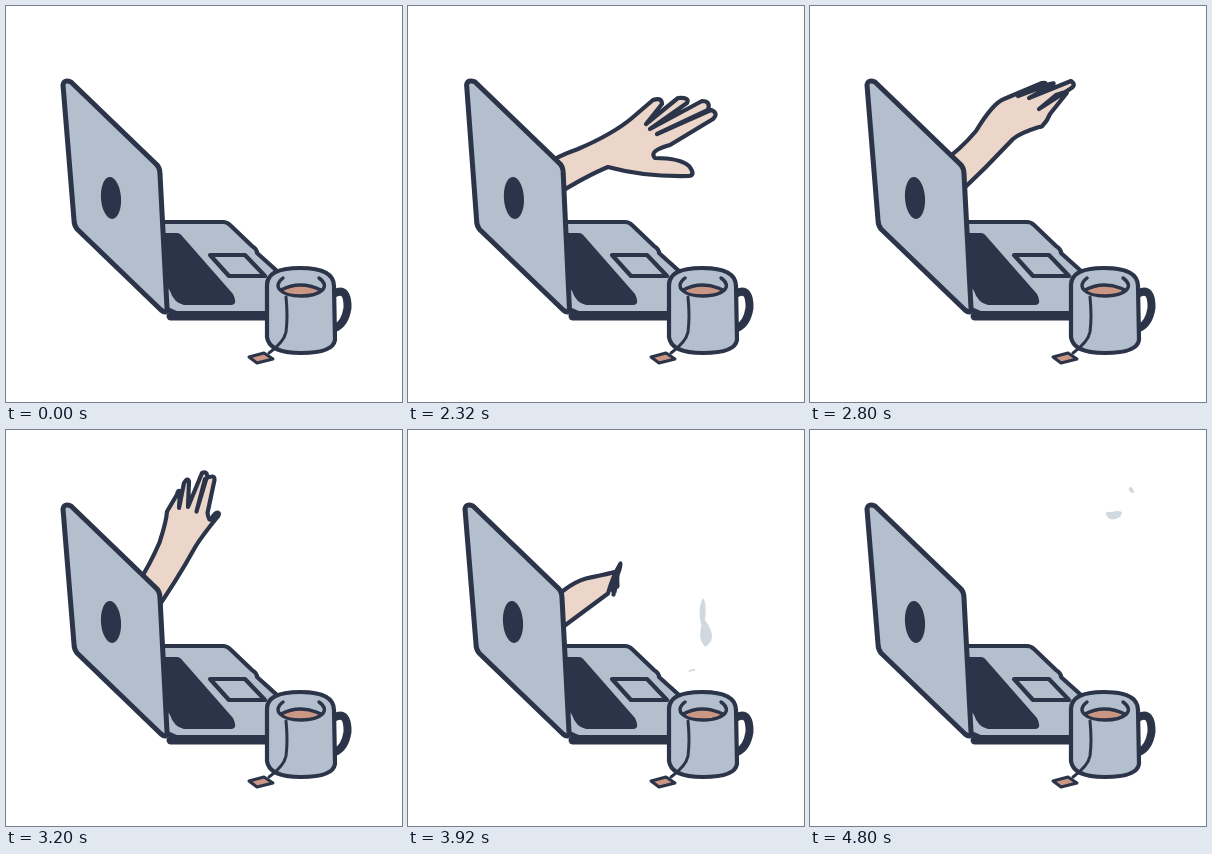
These frames come from a looping animation (396x396 px, 4880 ms). An HTML page:

```html
<!DOCTYPE html>
<html lang="en">
<head>
<meta charset="utf-8">
<title>Waving laptop</title>
<style>
  html, body { margin: 0; width: 100%; height: 100%; overflow: hidden; background: #fff; }
  svg { display: block; width: 100%; height: 100%; }
  .line { stroke: #2b3449; stroke-width: 4.2; stroke-linejoin: round; stroke-linecap: round; fill: none; }
  .metal { fill: #b3bfcc; }
  .dark { fill: #2b3449; }
  .skin { fill: #ecd6c9; }
  .tea { fill: #cb9784; }
  .steam { fill: #b3bfcc; opacity: .6; }
</style>
</head>
<body>
<svg viewBox="0 0 396 396">
  <g id="base">
    <path class="line" style="stroke-width:9" d="M165 310H270"/>
    <path class="line metal" d="M154 216H217Q221 216 224 219L246 240Q251 243 251 247L290 282V307H170L154 300Z"/>
    <path class="dark" d="M154 227H171Q174 227 177 231L227 288Q232 298 226 299H178Q168 297 164 285L154 270Z"/>
    <path class="line" d="M204 249H239L259 270H223Z"/>
  </g>
  <path id="hand" class="line skin"/>
  <path id="lid" class="line metal" style="stroke-width:5"/>
  <ellipse id="badge" class="dark" rx="10" ry="21"/>
  <g id="mug">
    <path class="line" style="stroke-width:8" d="M329 287Q342 281 341.5 302Q339 318 329 322"/>
    <path class="line metal" d="M261 279Q261 262 294 262Q328 262 328 280L329 334Q327 347 295 347Q263 347 261 331Z"/>
    <path class="tea" d="M274 285Q294 274 316 285Q311 291 294 291Q280 291 274 285Z"/>
    <path class="line" style="stroke-width:3.4" d="M277 272C265 281 276 290 295 290C314 290 326 281 313 272M275 284Q294 274 315 284"/>
    <path class="line" style="stroke-width:3" d="M280 291Q282 311 280 326Q278 336 263 347"/>
    <path class="line tea" style="stroke-width:3" d="M243 351L258 347L267 353L251 357Z"/>
  </g>
  <path id="wispA" class="steam"/>
  <path id="wispB" class="steam"/>
</svg>
<script>
const LOOP = 4880, STEP = 80;
const $ = id => document.getElementById(id);

// Every pose shares one structure: arm, four fingers, web, thumb, arm.
const peek = 'M120 170Q130 168 140 166Q145 163 150 165L176 162Q181 163 178 168L150 173L176 168Q178 171 174 173L152 177L172 173Q173 176 168 178L150 182L163 180Q163 183 160 184L150 186Q148 187 150 186Q157 185 160 187Q160 190 157 191Q150 193 146 194Q135 195 120 195Z';
const right = 'M136 160Q147 151 170 143Q205 128 224 112L245 94Q254 91 254 98L238 118L270 92Q282 91 279 97L242 123L294 95Q303 95 300 104L249 128L303 104Q311 107 305 113L262 139Q240 145 247 152Q272 152 281 160Q288 169 281 170Q236 171 200 161Q178 170 146 190Z';
const left = 'M132 150Q138 125 141 100Q138 85 128 70L110 52Q106 43 114 44L138 66L116 28Q117 18 124 24L145 62L131 11Q136 3 142 10L152 60L152 9Q158 3 161 12L163 58Q168 72 174 64Q182 48 190 46Q197 46 193 54Q182 85 176 100Q165 140 146 182Z';
const fold = 'M132 156Q150 144 166 125Q183 97 194 93L232 77Q238 76 234 79L208 90L240 78Q246 76 242 79L219 92L261 75Q267 79 260 83L229 103L246 89Q260 84 256 88L240 108Q238 112 237 114Q235 117 233 119Q232 121 229 121Q210 127 203 133Q176 162 146 190Z';
const up = 'M132 155Q142 146 164 137Q171 118 172 98L167 60Q168 52 173 55L176 95L175 36Q179 24 184 32L182 96L185 34Q190 26 194 38L188 97L194 42Q199 37 199 50L201 90Q203 106 207 100Q211 78 217 75Q226 70 224 80Q217 108 214 135Q185 152 142 178Z';
const tap = 'M140 206Q170 164 192 160Q237 168 241 186L243 262Q242 270 238 266L233 207L237 262Q236 266 234 260L231 228L231 254Q228 256 225 250L223 232L224 248Q221 246 220 240L216 213Q213 213 212 212Q206 211 205 207Q200 198 201 187Q193 183 186 192Q172 207 146 232Z';
const tucked = peek.replace(/(\d+) (\d+)/g, (_, x, y) => `${x - 42} ${y}`);

const handKeys = [[1920, tucked], [2000, peek], [2240, right], [2400, right], [2560, left], [2640, left],
  [2800, fold], [2880, right], [3040, left], [3120, left], [3280, fold], [3360, right],
  [3600, up], [3760, up], [4080, tap], [4240, tap], [4640, tucked]];

const lidRest = 'M57 79Q58 73 65 76L149 157Q154 161 154 168L161 302Q161 309 155 304L71 223Q68 219 68 214Z';
const lidLean = 'M49 80Q49 73 56 77L142 161Q147 165 148 171L159 302Q160 309 154 304L69 222Q66 218 65 213Z';
const leanKeys = [[1920, '0'], [2000, '1'], [2080, '.6'], [2240, '-.25'], [2320, '-.2'], [2480, '0']];

const dot = (x, y) => `M${x} ${y}` + `Q${x} ${y} ${x} ${y}`.repeat(4) + 'Z';
const wispA = [[3440, dot(282, 256)],
  [3680, 'M279 256Q274 248 284 238Q292 220 303 210Q305 226 294 243Q290 257 279 256Z'],
  [4160, 'M315 177Q305 170 303 154Q286 138 287 126Q293 120 300 137Q332 162 315 177Z'],
  [4480, 'M331 122Q322 118 320 108Q312 98 312 88Q318 86 324 96Q336 108 331 122Z'],
  [4720, 'M324 84Q320 82 319 79Q317 75 321 74Q325 76 326 80Q327 84 324 84Z'],
  [4800, 'M322 63Q320 62 319 60Q318 57 321 57Q323 58 324 61Q325 63 322 63Z']];
const wispB = [[3840, dot(282, 256)],
  [4160, 'M275 200Q276 189 289 190Q296 185 303 188Q305 194 296 196Q282 197 275 200Z'],
  [4720, 'M272 118Q274 102 288 94Q300 84 311 82Q312 88 303 95Q284 104 272 118Z'],
  [4800, 'M296 84Q295 81 302 82Q308 80 312 82Q312 87 306 89Q298 91 296 84Z']];

const NUM = /-?\d*\.?\d+/g;
const linear = p => p;
const smooth = p => p * p * (3 - 2 * p);

function mix(a, b, p) {
  const to = b.match(NUM);
  let i = 0;
  return a.replace(NUM, n => (+n + (to[i++] - n) * p).toFixed(2));
}

function at(keys, t, ease) {
  const next = keys.findIndex(k => k[0] > t);
  if (next === 0) return keys[0][1];
  if (next < 0) return keys[keys.length - 1][1];
  const [t0, a] = keys[next - 1], [t1, b] = keys[next];
  return mix(a, b, ease((t - t0) / (t1 - t0)));
}

function draw(ms) {
  const t = Math.floor(ms % LOOP / STEP) * STEP;
  const lean = +at(leanKeys, t, linear);
  $('hand').setAttribute('d', at(handKeys, t, smooth));
  $('lid').setAttribute('d', mix(lidRest, lidLean, lean));
  $('badge').setAttribute('transform', `translate(${105 - 4.5 * lean} 192) rotate(${-4 - 3 * lean})`);
  $('wispA').setAttribute('d', at(wispA, t, linear));
  $('wispB').setAttribute('d', at(wispB, t, linear));
}

let start;
function tick(now) {
  start ??= now;
  draw(now - start);
  requestAnimationFrame(tick);
}
draw(0);
requestAnimationFrame(tick);
</script>
</body>
</html>
```
